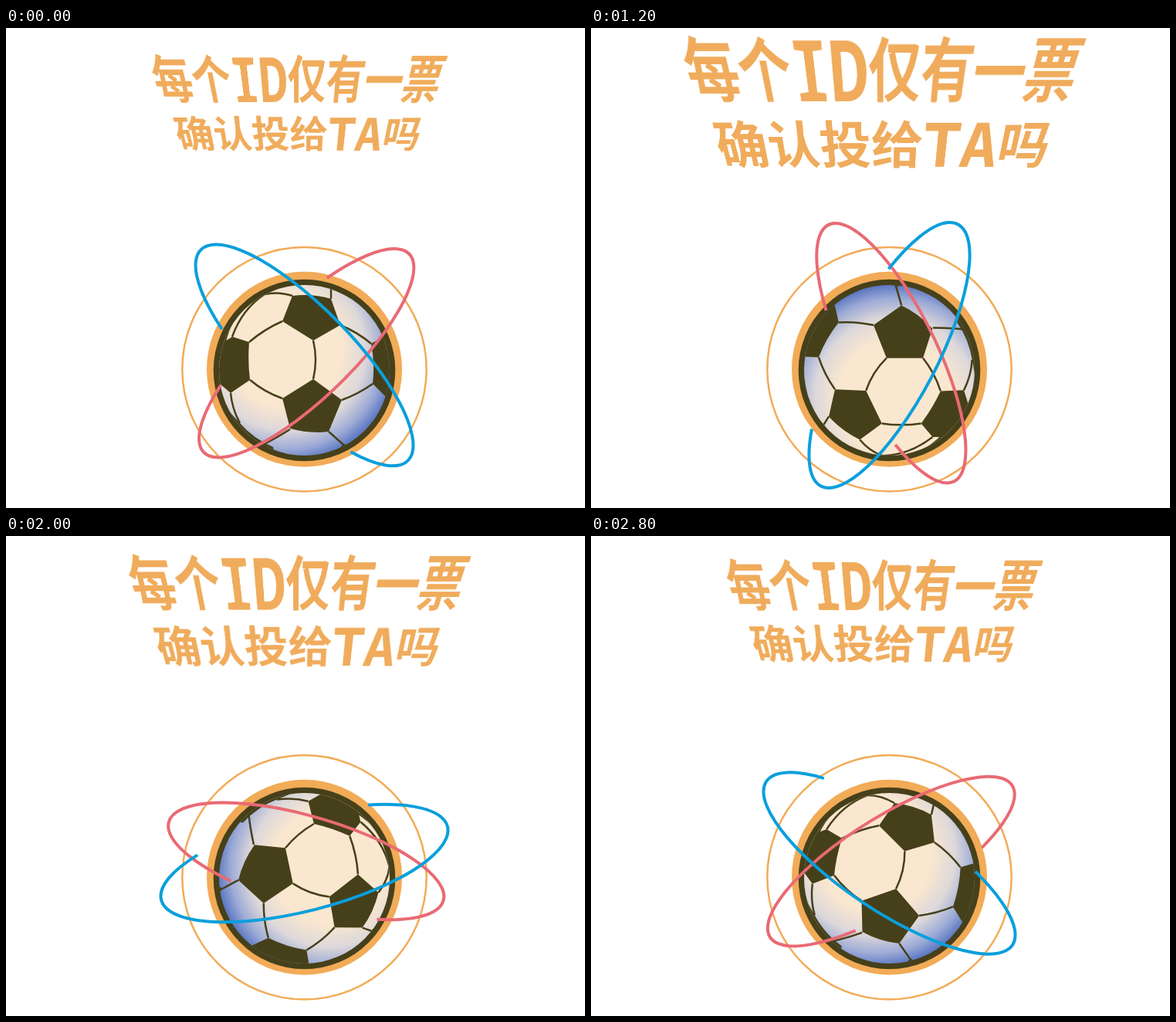
An HTML page for the animation above (3000 ms loop, 750 px wide and 622 px high).

```html
<!DOCTYPE html>
<html lang="zh">
<head>
<meta charset="utf-8">
<title>投票确认</title>
<style>
  html, body { margin: 0; width: 100%; height: 100%; overflow: hidden; background: #fff; }
  #stage { position: relative; width: 750px; height: 622px; overflow: hidden; }
  svg { position: absolute; left: 0; top: 0; }
  #title { position: absolute; inset: 0; transform-origin: 380px 99.5px; }
  .line {
    position: absolute; left: 0; text-align: center; white-space: nowrap;
    font-family: "Noto Sans CJK SC", "Noto Sans CJK", sans-serif;
    font-weight: 900; line-height: 1; color: #f0ac5c; transform-origin: 50% 100%;
  }
  .line span {
    font-family: "Noto Sans Mono", monospace; font-size: 1.22em; font-weight: 700;
    line-height: 0; vertical-align: -.06em;
  }
  #top { top: 0; width: 755px; font-size: 94px; transform: perspective(420px) rotateX(-30deg) scaleX(.69); }
  #bottom { top: 110px; width: 757px; font-size: 70px; transform: perspective(420px) rotateX(-30deg) scaleX(.92); }
</style>
</head>
<body>
<div id="stage">
  <svg width="750" height="622" fill="none">
    <defs>
      <radialGradient id="shade" gradientUnits="userSpaceOnUse" cx="362" cy="418" r="152">
        <stop offset=".48" stop-color="#fae7cf"/>
        <stop offset=".68" stop-color="#ddd8da"/>
        <stop offset=".84" stop-color="#9dabd6"/>
        <stop offset="1" stop-color="#4464bb"/>
      </radialGradient>
      <clipPath id="edge"><circle cx="386.5" cy="443.5" r="110.5"/></clipPath>
    </defs>

    <circle cx="386.5" cy="442.3" r="158.2" stroke="#f2ab57" stroke-width="2.5"/>
    <circle cx="386.5" cy="442.3" r="126.5" fill="#f2ab57"/>
    <circle cx="386.5" cy="443.5" r="117.8" fill="#46401a"/>

    <g clip-path="url(#edge)">
      <g id="ball">
        <circle cx="386.5" cy="443.5" r="112" fill="url(#shade)"/>
        <g fill="#46401a">
          <path d="M358 380L371 347Q397 344 421 351L433 385L398 405Z"/>
          <path d="M398 455L435 482L418 523Q393 526 368 519L358 480Z"/>
          <path d="M293 400L315 407Q313 432 316 456L291 473L270 455V415Z"/>
          <path d="M473 409L487 401L510 395V490L491 477L475 461Q478 435 473 409Z"/>
          <path d="M283 490L302 511Q320 532 346 543L350 570L280 560Z"/>
        </g>
        <g stroke="#46401a" stroke-width="2.5">
          <path d="M358 380Q335 390 315 407M398 405Q404 430 398 455M358 480Q335 472 316 456"/>
          <path d="M433 385Q455 394 473 409M475 461Q457 474 435 482"/>
          <path d="M371 347Q352 341 335 345Q306 364 293 400M421 351L421 330"/>
          <path d="M368 520Q346 534 328 542M418 523L437 540L452 546M437 540L428 556"/>
          <path d="M291 473Q293 494 303 512M283 410Q287 390 298 372"/>
        </g>
      </g>
    </g>

    <g stroke-width="4">
      <path id="red" stroke="#e96a74" d="M-108.7-47.2A185 58.4 0 1 0 86.9-51.6"/>
      <path id="blue" stroke="#0a9fdc" d="M-131.4-44.7A191.4 61.5 0 1 0 98.6-52.7"/>
    </g>
  </svg>
  <div id="title">
    <div class="line" id="top">每个<span>ID</span>仅有一票</div>
    <div class="line" id="bottom">确认投给<span>TA</span>吗</div>
  </div>
</div>
<script>
  const LOOP = 3000, STEP = 200;
  const byId = id => document.getElementById(id);
  const ball = byId('ball'), red = byId('red'), blue = byId('blue'), title = byId('title');

  // [time, value] pairs, joined by straight lines
  const titleScale = [[0, .735], [1200, 1], [1800, .776], [2400, 1], [3000, .68]];
  const ballAngle = [[0, 0], [400, 54], [800, 93.5], [1400, 175], [2000, 250], [2400, 283], [2800, 347], [3000, 360]];

  function valueAt(track, time) {
    const next = track.findIndex(([t]) => t > time);
    const [t0, v0] = track[next - 1], [t1, v1] = track[next];
    return v0 + (v1 - v0) * (time - t0) / (t1 - t0);
  }

  function draw(now) {
    const step = Math.floor(now % LOOP / STEP), time = step * STEP;
    ball.setAttribute('transform', `rotate(${-valueAt(ballAngle, time)} 386.5 443.5)`);
    red.setAttribute('transform', `translate(389 421.5) rotate(${-44 - 12 * step})`);
    blue.setAttribute('transform', `translate(386.5 424) rotate(${12 * step - 134.4})`);
    title.style.transform = `scale(${valueAt(titleScale, time)})`;
  }

  const start = performance.now();
  function tick() {
    draw(performance.now() - start);
    requestAnimationFrame(tick);
  }
  tick();
</script>
</body>
</html>
```
